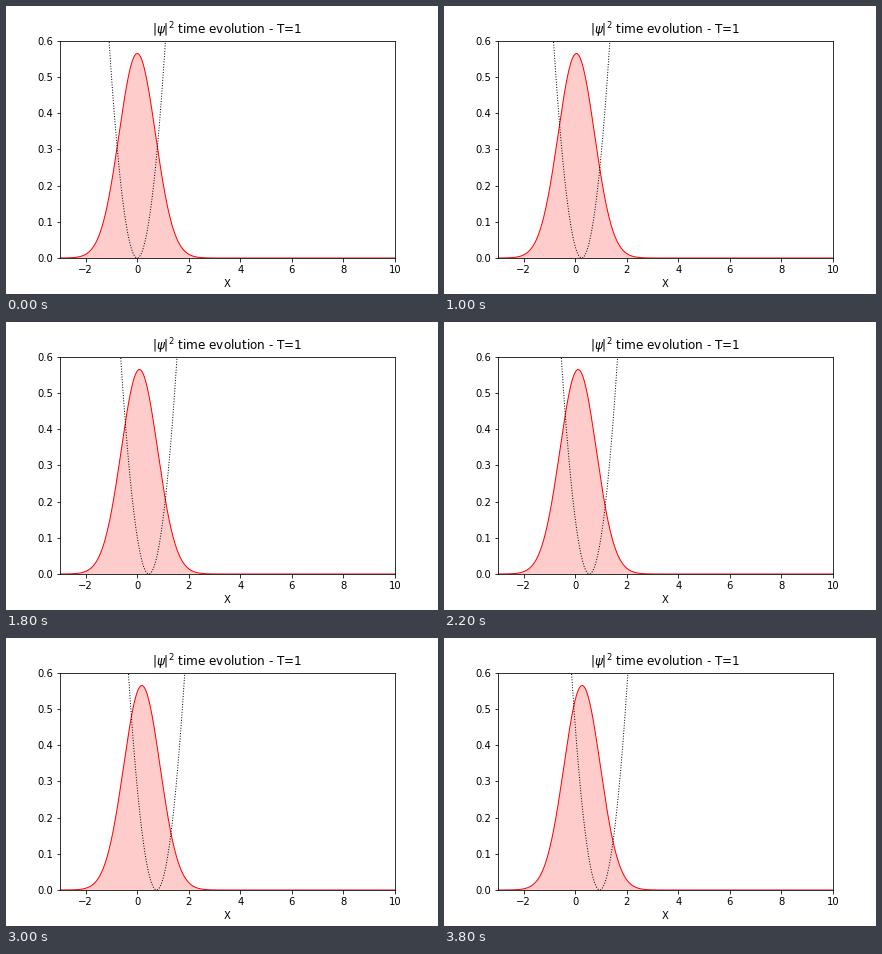
A matplotlib script that plays this animation: 432 px wide and 288 px high, repeating every 4 s.

```python
import numpy as np
import matplotlib.pyplot as plt
from matplotlib.animation import FuncAnimation

FRAMES, INTERVAL = 20, 200
DT = 0.05    # trap displacement per frame
KICK = 0.16  # initial packet velocity

x = np.linspace(-10, 10, 1001)


def packet_center(t):
    """Packet in a unit-frequency trap dragged at unit speed."""
    return t - (1 - KICK) * np.sin(t)


def density(t):
    return np.exp(-(x - packet_center(t)) ** 2) / np.sqrt(np.pi)


def potential(t):
    return 0.5 * (x - t) ** 2


fig, ax = plt.subplots(figsize=(6, 4), dpi=72)
fig.subplots_adjust(left=0.125, right=0.9, bottom=0.125, top=0.88)


def draw(i):
    t = i * DT
    rho = density(t)
    ax.clear()
    ax.plot(x, rho, color="red", lw=1)
    ax.fill_between(x, rho, color="red", alpha=0.2, lw=0)
    ax.plot(x, potential(t), color="black", ls=":", lw=1)
    ax.set_xlim(-3, 10)
    ax.set_ylim(0, 0.6)
    ax.set_xticks(range(-2, 11, 2))
    ax.set_xlabel("X")
    ax.set_title(r"$|\psi|^2$ time evolution - T=1")


anim = FuncAnimation(fig, draw, frames=FRAMES, init_func=lambda: draw(0),
                     interval=INTERVAL, repeat=True, repeat_delay=0)
plt.show()
```
